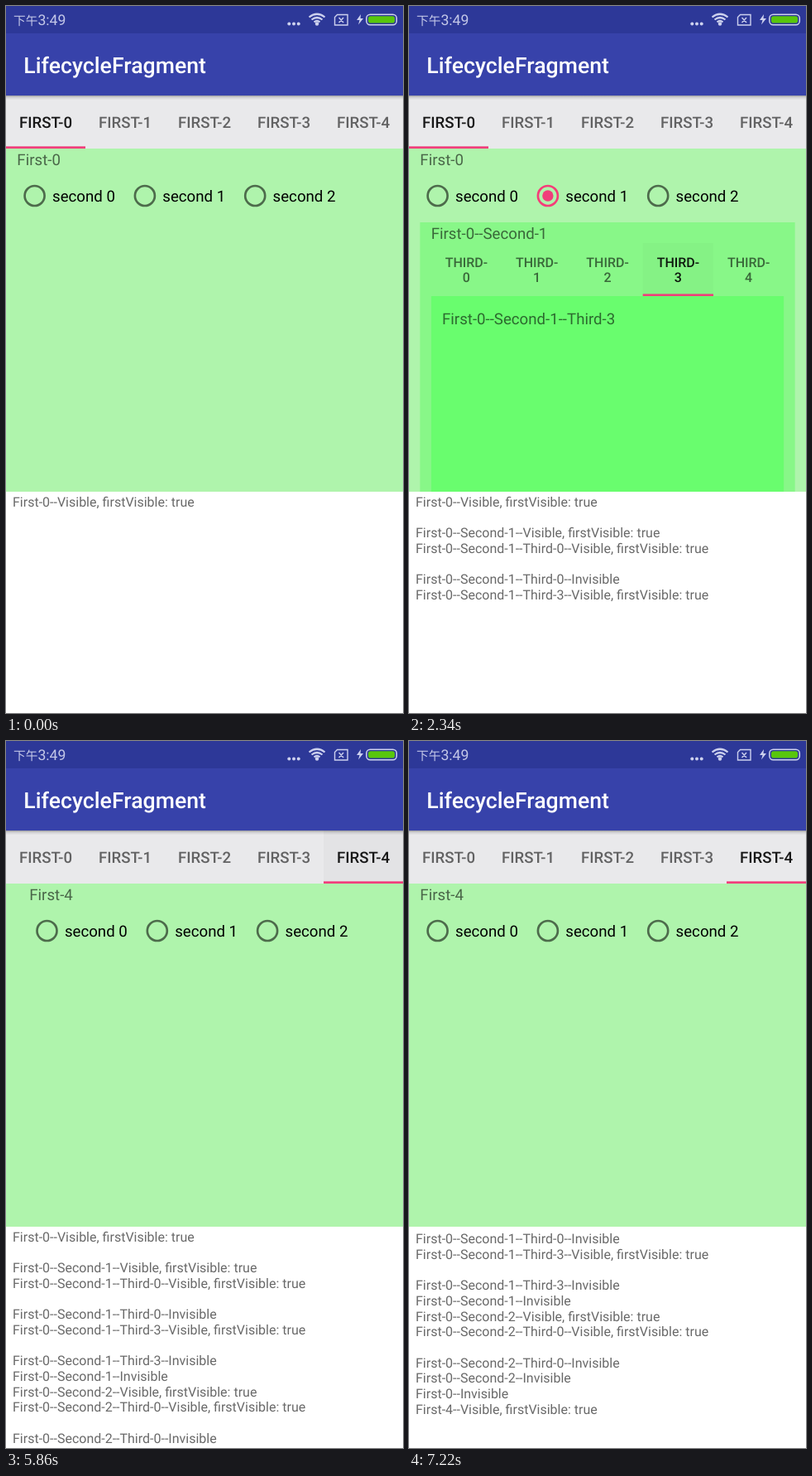
Recreate the animation shown at these times as an HTML page. Size 480 by 853 pixels, loop 8000 ms.

```html
<!DOCTYPE html>
<html lang="zh">
<head>
<meta charset="utf-8">
<title>LifecycleFragment</title>
<style>
  html, body { margin: 0; width: 100%; height: 100%; overflow: hidden; background: #fff; }
  svg { display: block; }
  text {
    font: 18.67px Roboto, "Noto Sans CJK SC", "Noto Sans CJK", sans-serif;
    text-rendering: geometricPrecision;
    fill: rgba(0, 0, 0, .58);
    white-space: pre;
  }
  .clock { font-size: 17.6px; fill: #c4c8e8; }
  .clock tspan { font-size: 14.7px; }
  .title { font-size: 26.67px; font-weight: 500; fill: #fff; }
  .tab { font-weight: 500; text-anchor: middle; }
  .tab.on { fill: rgba(0, 0, 0, .9); }
  .small { font-size: 16px; }
  .label { fill: #000; }
  .log { font-size: 16px; fill: #696969; }
  .ring { fill: none; stroke: rgba(0, 0, 0, .56); stroke-width: 2.67; }
  .ring.on { stroke: #f53d79; }
  .dot, .bar { fill: #f03e7b; }
  .icon { fill: none; stroke: #cdd1ee; }
</style>
</head>
<body>
<svg id="stage" width="480" height="853" viewBox="0 0 480 853">
  <defs>
    <linearGradient id="shade" x2="0" y2="1">
      <stop offset="0" stop-opacity=".32"/>
      <stop offset=".4" stop-opacity=".1"/>
      <stop offset="1" stop-opacity="0"/>
    </linearGradient>
  </defs>
  <rect width="480" height="853" fill="#fff"/>
  <rect width="480" height="33" fill="#2d3898"/>
  <rect y="33" width="480" height="75" fill="#3742aa"/>
  <text class="clock" x="9" y="23"><tspan>下午</tspan>3:49</text>
  <g fill="#cdd1ee">
    <circle cx="342.300" cy="21.500" r="2"/>
    <circle cx="348" cy="21.500" r="2"/>
    <circle cx="353.700" cy="21.500" r="2"/>
    <circle cx="376" cy="21.500" r="2.200"/>
    <path d="M429 10l-5 7h3.500l-1.500 5.500 6-7.500h-3.500z"/>
  </g>
  <g class="icon" stroke-width="2.200">
    <path d="M366.500 13.500q9.500-7.500 19 0M369.500 16.500q6.500-5 13 0M372.500 19.300q3.500-2.600 7 0"/>
    <path stroke-width="1.400" d="M400.500 10.500h12.500v12.500h-15.500v-9.500zM402.500 14l5.500 6M408 14l-5.500 6"/>
    <rect stroke-width="1.500" x="435.800" y="10.200" width="36.500" height="12.500" rx="4.500"/>
  </g>
  <rect x="438" y="12.300" width="32" height="8.300" rx="2.800" fill="#58c60c"/>
  <text class="title" x="21.330" y="81">LifecycleFragment</text>

  <rect y="108" width="480" height="64" fill="#e9e9eb"/>
  <rect y="108" width="480" height="5.500" fill="url(#shade)"/>
  <rect id="topPress" x="384" y="108" width="96" height="64"/>
  <g id="topTabs"></g>
  <rect id="topBar" class="bar" y="169.330" height="2.670"/>

  <svg y="172" width="480" height="414" viewBox="0 172 480 414">
    <rect y="172" width="480" height="414" fill="#aff4ac"/>
    <g id="pages"></g>
  </svg>

  <svg y="586" width="480" height="267" viewBox="0 586 480 267">
    <g id="log"></g>
    <path id="glow" fill="#dddee6"/>
    <rect id="thumb" x="474.700" width="5.300" height="199" fill="#aeaeae"/>
  </svg>
</svg>
<script>
const NS = 'http://www.w3.org/2000/svg';
const $ = id => document.getElementById(id);
const clamp = v => Math.max(0, Math.min(1, v));

function add(parent, tag, attrs, text) {
  const el = parent.appendChild(document.createElementNS(NS, tag));
  set(el, attrs);
  if (text) el.textContent = text;
  return el;
}
function set(el, attrs) {
  for (const k in attrs) el.setAttribute(k, attrs[k]);
}
const show = (el, on) => set(el, { visibility: on ? 'visible' : 'hidden' });
const range = (n, fn) => Array.from({ length: n }, (_, i) => fn(i));

// Event times in ms
const LOOP = 8000, STEP = 80, PHASE = 500;
const TAP_1 = 500, TAP_THIRD = 1940, TAP_2 = 3140, TAP_FIRST = 5540, DRAG = 6180;
const CHECK_DELAY = 160;

const topTabs = range(5, i => add($('topTabs'), 'text', { x: 48 + 96 * i, y: 147 }, 'FIRST-' + i));

// Outer pages, each with three radio buttons
const pages = range(5, i => {
  const g = add($('pages'), 'g', { transform: `translate(${480 * i})` });
  add(g, 'text', { x: 13.33, y: 192 }, 'First-' + i);
  const radios = range(3, k => {
    const cx = 34.6 + 133.3 * k, cy = 229;
    const ripple = add(g, 'circle', { cx, cy, r: 0 });
    const ring = add(g, 'circle', { cx, cy, r: 12, class: 'ring' });
    const dot = add(g, 'circle', { cx, cy, r: 0, class: 'dot' });
    add(g, 'text', { x: cx + 21.4, y: 236, class: 'label' }, 'second ' + k);
    return { ripple, ring, dot };
  });
  return { g, radios };
});
const radios = pages[0].radios;

// Nested pane on the first page
const TAB_W = 85.33, PANE_X = 26.67, PANE_W = TAB_W * 5;
const pane = add(pages[0].g, 'g', {});
add(pane, 'rect', { x: 13.33, y: 261, width: 453.33, height: 326, fill: '#88f788' });
const paneTitle = add(pane, 'text', { x: 26.67, y: 281 });
const thirdPress = add(pane, 'rect', { x: PANE_X + 3 * TAB_W, y: 286, width: TAB_W, height: 64 });
const thirdTabs = range(5, i => {
  const x = PANE_X + TAB_W * (i + .5);
  return [
    add(pane, 'text', { x, y: 315 }, 'THIRD-'),
    add(pane, 'text', { x, y: 333 }, String(i))
  ];
});
const thirdBar = add(pane, 'rect', { class: 'bar', y: 347.4, height: 2.67 });
const inner = add(pane, 'svg', {
  x: PANE_X, y: 350, width: PANE_W, height: 237, viewBox: `0 350 ${PANE_W} 237`
});
add(inner, 'rect', { y: 350, width: PANE_W, height: 237, fill: '#69fd6e' });
const thirdPages = add(inner, 'g', {});
const thirdTexts = range(5, i => add(thirdPages, 'text', { x: 13.33 + PANE_W * i, y: 384 }));

// Log groups: [time shown, lines]; "+" means became visible, "-" hidden
const groups = [
  [0, ['+First-0']],
  [TAP_1 + CHECK_DELAY, ['+First-0--Second-1', '+First-0--Second-1--Third-0']],
  [TAP_THIRD + 80, ['-First-0--Second-1--Third-0', '+First-0--Second-1--Third-3']],
  [TAP_2 + CHECK_DELAY, ['-First-0--Second-1--Third-3', '-First-0--Second-1',
    '+First-0--Second-2', '+First-0--Second-2--Third-0']],
  [TAP_FIRST + 80, ['-First-0--Second-2--Third-0', '-First-0--Second-2', '-First-0', '+First-4']]
];
let row = 0;
const logGroups = groups.map(([at, lines]) => {
  const g = add($('log'), 'g', {});
  for (const line of lines) {
    const state = line[0] === '+' ? '--Visible, firstVisible: true' : '--Invisible';
    add(g, 'text', { x: 8, y: 604 + 18.667 * row++, class: 'log' }, line.slice(1) + state);
  }
  row++;
  return { at, g };
});

const quint = u => 1 - (1 - clamp(u)) ** 5;

// cubic-bezier(.4, 0, .2, 1)
function fastOutSlowIn(x) {
  x = clamp(x);
  let lo = 0, hi = 1;
  for (let i = 0; i < 20; i++) {
    const s = (lo + hi) / 2;
    if (1.2 * s * (1 - s) ** 2 + .6 * s * s * (1 - s) + s ** 3 < x) lo = s; else hi = s;
  }
  return 3 * lo * lo * (1 - lo) + lo ** 3;
}

// A far jump grows the bar from a point just left of its target
function growBar(bar, left, width, u) {
  const e = fastOutSlowIn(u), x = left - 32 * (1 - e);
  set(bar, { x, width: width * e });
}

function press(el, age) {
  const a = age < 0 ? 0 : Math.min(.015 + age / 4800, .028) * clamp((480 - age) / 120);
  set(el, { 'fill-opacity': a });
}

function drawTop(t) {
  const jumped = t >= TAP_FIRST, chosen = jumped ? 4 : 0;
  topTabs.forEach((el, i) => set(el, { class: i === chosen ? 'tab on' : 'tab' }));
  growBar($('topBar'), 96 * chosen, 96, jumped ? (t - TAP_FIRST) / 300 : 1);
  press($('topPress'), t - TAP_FIRST);
  const x = jumped ? 1920 * quint((t - TAP_FIRST + 6.3) / 525) : 0;
  set($('pages'), { transform: `translate(${-x})` });
}

function drawRadios(t, second) {
  radios.forEach(({ ripple, ring, dot }, k) => {
    const tap = [Infinity, TAP_1, TAP_2][k], age = t - tap, on = k === second;
    set(ring, { class: on ? 'ring on' : 'ring' });
    set(dot, { r: on ? 6.7 * clamp((age - CHECK_DELAY + 80) / 160) : 0 });
    set(ripple, {
      r: age < 0 ? 0 : 32 * clamp((age + 80) / 240),
      'fill-opacity': .11 * clamp((480 - age) / 240)
    });
  });
}

function drawPane(t, second) {
  show(pane, second > 0);
  const name = 'First-0--Second-' + second;
  paneTitle.textContent = name;
  thirdTexts.forEach((el, i) => { el.textContent = `${name}--Third-${i}`; });
  const jumped = second === 1 && t >= TAP_THIRD, chosen = jumped ? 3 : 0;
  thirdTabs.forEach((pair, i) => pair.forEach(el =>
    set(el, { class: i === chosen ? 'tab small on' : 'tab small' })));
  growBar(thirdBar, PANE_X + TAB_W * chosen, TAB_W, jumped ? (t - TAP_THIRD) / 300 : 1);
  press(thirdPress, t - TAP_THIRD);
  const x = jumped ? 3 * PANE_W * quint((t - TAP_THIRD + 6) / 420) : 0;
  set(thirdPages, { transform: `translate(${-x})` });
}

function drawLog(t) {
  logGroups.forEach(({ at, g }) => show(g, t >= at));
  const y = 91 * clamp((t - DRAG + 55) / 160);
  set($('log'), { transform: `translate(0 ${-y})` });
  set($('thumb'), {
    y: 586 + y * 267 / 358,
    opacity: t < DRAG ? 0 : clamp((7220 - t) / 240)
  });

  // Overscroll glow: a flattened circle segment that recedes
  const peak = DRAG + 160;
  const s = t < peak ? 0 : (1 - clamp((t - peak) / 640)) ** 2;
  const cx = 167, k = .394 * s;
  const edge = x => 853 - k * (Math.sqrt(720 ** 2 - (x - cx) ** 2) - 623.5);
  set($('glow'), {
    d: `M0 853V${edge(0)}A720 ${720 * k} 0 0 1 480 ${edge(480)}V853Z`,
    opacity: Math.sqrt(s)
  });
}

function draw(now) {
  const t = Math.max(0, PHASE + Math.floor((now % LOOP - PHASE) / STEP) * STEP);
  const second = t >= TAP_2 + CHECK_DELAY ? 2 : t >= TAP_1 + CHECK_DELAY ? 1 : -1;
  drawTop(t);
  drawRadios(t, second);
  drawPane(t, second);
  drawLog(t);
}

const start = performance.now();
function tick() {
  draw(performance.now() - start);
  requestAnimationFrame(tick);
}
tick();
</script>
</body>
</html>
```
